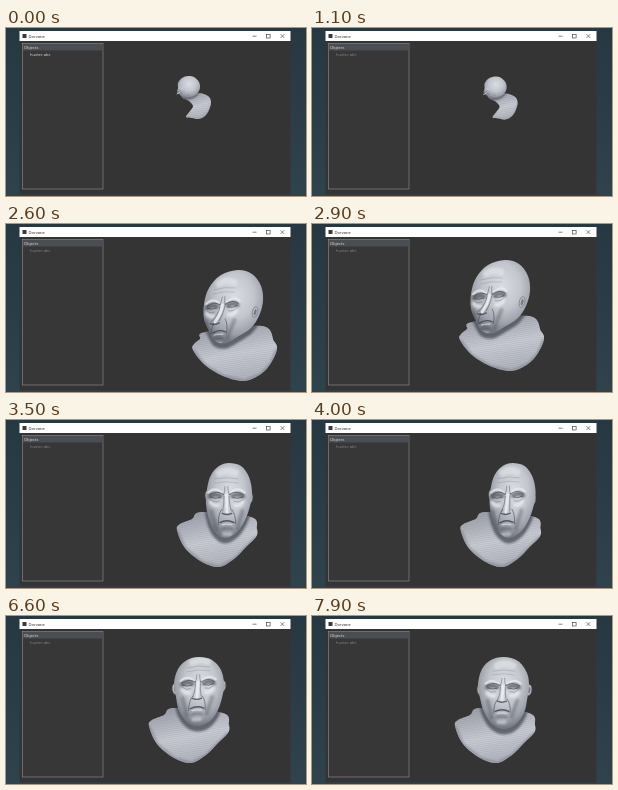
An HTML page that plays this animation: 300 by 168 pixels, repeating every 8 s.

```html
<!DOCTYPE html>
<html lang="en">
<head>
<meta charset="utf-8">
<title>Model viewer</title>
<style>
  html, body { margin: 0; width: 100%; height: 100%; overflow: hidden; background: #2b3d47; }
  svg { display: block; width: 100vw; height: 100vh; }
  text { font-family: "Open Sans", "Noto Sans", sans-serif; font-size: 4.1px; }
</style>
</head>
<body>
<svg viewBox="0 0 300 168">
  <defs>
    <linearGradient id="desk" x2="0" y2="1">
      <stop offset="0" stop-color="#263842"/><stop offset="1" stop-color="#2f434d"/>
    </linearGradient>
    <radialGradient id="skin" cx=".53" cy=".36" r=".62">
      <stop offset="0" stop-color="#d9dce2"/><stop offset=".5" stop-color="#c3c6cd"/>
      <stop offset=".82" stop-color="#9da1aa"/><stop offset="1" stop-color="#747983"/>
    </radialGradient>
    <linearGradient id="chest" x1=".2" y1="0" x2=".5" y2="1">
      <stop offset="0" stop-color="#9a9ea7"/><stop offset=".55" stop-color="#c9ccd3"/>
      <stop offset="1" stop-color="#b0b4bc"/>
    </linearGradient>
    <pattern id="ribs" width="4" height="2" patternUnits="userSpaceOnUse" patternTransform="rotate(9)">
      <path d="M0 .5H4" stroke="#4d525c" stroke-width=".5" opacity=".22"/>
    </pattern>
    <filter id="soft" x="-50%" y="-50%" width="200%" height="200%"><feGaussianBlur stdDeviation="1.3"/></filter>
    <filter id="fine" x="-20%" y="-20%" width="140%" height="140%"><feGaussianBlur stdDeviation=".3"/></filter>
    <clipPath id="headClip"><path id="headEdge"/></clipPath>
    <clipPath id="torsoClip"><path id="torsoEdge"/></clipPath>
  </defs>

  <rect width="300" height="168" fill="url(#desk)"/>
  <rect x="13.5" y="3" width="271" height="163.5" fill="#343434"/>
  <rect x="13.5" y="3" width="271" height="10" fill="#fff"/>
  <rect x="16.5" y="6" width="4" height="4" fill="#3a3a3a"/>
  <text x="22.5" y="9.7" fill="#222">Dorvane</text>
  <g fill="none" stroke="#333" stroke-width=".6">
    <path d="M246.5 8.2h4M274.5 6.2l3.8 3.8m0-3.8l-3.8 3.8"/>
    <rect x="260.5" y="6.4" width="3.6" height="3.6"/>
  </g>
  <rect x="16.5" y="15.5" width="80.5" height="145.5" fill="#373737" stroke="#858585" stroke-width=".7"/>
  <rect x="17" y="16" width="79.5" height="6.5" fill="#4a4d51"/>
  <text x="18" y="21.2" fill="#e4e4e4">Objects</text>
  <text id="label" x="24" y="27.7">huxter.abc</text>
  <g id="bust"></g>
</svg>
<script>
const $ = id => document.getElementById(id);
const LOOP = 8000, STEP = 100;
const LIGHT = '#eceef2', DARK = '#3c4049';
const HEAD = 28, TORSO = 24;

// A pose holds the head outline, the torso outline, then eyes, nose tip, mouth, ears, detail scale, left ear opacity.
const frontTorso = [168,92, 158,99, 146,104, 143,110, 151,128, 168,142, 185,147, 200,139, 212,127, 222,117, 223,109, 217,97];
const bowedHead = [195,43, 207,46, 215,57, 218,72, 216,86, 211,100, 203,112, 191,118, 181,112, 175,100, 172,84, 173,69, 177,55, 185,46];

const small = [
  182,48, 188,49, 193,54, 194,60, 191,66, 186,69, 181,70, 177,70, 175,68, 173,66, 171,64, 172,60, 172,55, 176,50,
  177,69, 183,73, 187,78, 184,83, 180,89, 186,90, 193,91, 199,88, 203,82, 205,74, 202,68, 192,65,
  172,63, 176,65, 171,66, 174,68, 172,62, 182,67, .3, 0];
const above = [
  176,84, 190,87, 200,97, 201,110, 195,122, 185,130, 174,137, 163,137, 154,133, 149,127, 148,120, 152,112, 152,101, 162,88,
  168,136, 172,142, 172,150, 174,155, 182,158, 190,161, 199,161, 209,158, 216,154, 221,151, 212,134, 201,114,
  151,119, 161,124, 148,127, 156,133, 150,118, 175,132, .8, 0];
const turned = [
  232,46, 246,50, 255,62, 257,77, 253,92, 245,104, 233,112, 220,119, 209,117, 203,107, 198,95, 198,80, 203,64, 215,51,
  199,108, 194,115, 188,120, 187,126, 199,141, 217,152, 238,157, 255,150, 265,139, 271,125, 268,117, 256,102,
  206,82, 227,80, 209,98, 213,107, 199,84, 249,88, 1, 0];
const bowed = [...bowedHead, ...frontTorso,
  181,75, 204,75, 193,92, 193,101, 174,76, 216,78, 1, 1];
const tilted = [...bowedHead, ...frontTorso,
  179,75, 200,74, 187,92, 188,101, 174,75, 215,80, 1, 1];
const raised = [
  193,41, 206,44, 215,54, 218,68, 216,82, 211,96, 203,106, 192,110, 181,106, 173,95, 170,81, 168,67, 172,53, 181,44,
  ...frontTorso,
  181,67, 203,66, 191,81, 191,91, 169,73, 217,70, 1, 1];
const level = [
  192,41, 206,45, 215,57, 217,70, 215,84, 212,97, 203,109, 191,113, 180,108, 172,96, 168,82, 166,68, 170,53, 179,44,
  ...frontTorso,
  180,70, 202,70, 190,84, 190,94, 168,74, 217,74, 1, 1];

const lerp = (a, b, k) => a.map((v, i) => v + (b[i] - v) * k);
const moved = (pose, dx, dy) =>
  pose.map((v, i) => i >= HEAD + TORSO + 12 ? v : v + (i % 2 ? dy : dx));

const lowered = moved(small, 1, 36);
const leaning = moved(lerp(above, turned, .06), -12, 2);
const turnedLeft = moved(turned, -39, -10);
const bowedRight = moved(bowed, 28, 0);

const keys = [
  [0, small], [900, small], [1100, moved(small, .6, .6)], [1400, moved(small, .6, .6)],
  [1600, lowered], [1800, lowered], [1900, above], [2000, leaning], [2200, leaning],
  [2600, turned], [2700, turned], [2900, turnedLeft], [3100, turnedLeft],
  [3500, bowedRight], [3600, bowedRight], [4100, tilted], [5500, tilted],
  [6400, raised], [6600, raised], [7900, level], [LOOP, level]];

function poseAt(t) {
  const i = keys.findIndex(([time]) => time > t);
  const [t0, a] = keys[i - 1], [t1, b] = keys[i];
  return lerp(a, b, (t - t0) / (t1 - t0));
}

const pairs = list => Array.from({ length: list.length / 2 }, (_, i) => [list[2 * i], list[2 * i + 1]]);
const fmt = p => p.map(v => v.toFixed(2)).join(' ');

// Closed Catmull-Rom curve through the points.
function smooth(points) {
  const n = points.length, at = i => points[(i + n) % n];
  const handle = (p, a, b) => p.map((v, k) => v + (b[k] - a[k]) / 6);
  return 'M' + fmt(points[0]) + points.map((p, i) => {
    const q = at(i + 1);
    return `C${fmt(handle(p, at(i - 1), q))} ${fmt(handle(q, at(i + 2), p))} ${fmt(q)}`;
  }).join('') + 'Z';
}

function faceParts(face) {
  const [eyeL, eyeR, tip, mouth] = pairs(face.slice(0, 8));
  const s = face[12];
  const mid = lerp(eyeL, eyeR, .5);
  // u runs across the eyes, v from the eyes down to the mouth.
  const at = (u, v, origin = mid) => origin.map((o, k) => o + u * (eyeR[k] - eyeL[k]) / 2 + v * (mouth[k] - mid[k]));
  const arc = (a, b, c, color, width, opacity) =>
    `<path d="M${fmt(a)}Q${fmt(b)} ${fmt(c)}" stroke="${color}" stroke-width="${width * s}" opacity="${opacity}"/>`;
  const line = (u1, v1, u2, v2, u3, v3, ...style) => arc(at(u1, v1), at(u2, v2), at(u3, v3), ...style);
  const both = (u1, v1, u2, v2, u3, v3, ...style) =>
    line(u1, v1, u2, v2, u3, v3, ...style) + line(-u1, v1, -u2, v2, -u3, v3, ...style);

  const shade =
    both(.5, .04, 1, -.08, 1.45, .06, DARK, 4.2, .62) +
    both(1.35, .62, 1.1, .95, .9, 1.3, DARK, 4, .32) +
    both(.75, .4, 1.1, .44, 1.4, .28, LIGHT, 4, .75) +
    line(-.6, -.85, .1, -1, .8, -.85, LIGHT, 7, .5) +
    line(-.45, 1.3, 0, 1.24, .45, 1.3, DARK, 2.4, .4) +
    line(-.3, 1.5, 0, 1.52, .3, 1.5, LIGHT, 4, .5);
  const detail =
    both(.35, -.08, 1, -.34, 1.6, -.1, LIGHT, 2, .7) +
    both(.25, -.02, .9, -.2, 1.5, 0, DARK, 1.1, .6) +
    both(.55, .1, 1, .17, 1.4, .08, DARK, .9, .7) +
    both(.65, .24, 1.05, .32, 1.4, .18, DARK, .7, .4) +
    both(.12, -.32, .12, -.12, .26, 0, DARK, .8, .5) +
    both(.45, .56, .78, .75, .75, 1.12, DARK, 1, .55) +
    [-.46, -.62].map(v => line(-1, v, 0, v - .1, 1, v, DARK, .6, .28)).join('') +
    line(-.62, 1.06, 0, .92, .62, 1.06, DARK, 1.3, .8) +
    line(-.4, 1.14, 0, 1.1, .4, 1.14, LIGHT, 1.3, .6);
  const side = u => arc(at(u, .05), at(u, .35), at(u * 1.7, -.03, tip), DARK, 1.1, .4);
  const nose = side(-.22) + side(.22) +
    arc(at(0, 0), at(0, .3), tip, LIGHT, 2.8, .85) +
    arc(at(-.42, .05, tip), at(0, .14, tip), at(.42, .05, tip), DARK, 1.4, .75);
  return { shade, detail, nose };
}

function ear([x, y], s, tilt, opacity) {
  return `<g transform="translate(${x} ${y}) rotate(${tilt}) scale(${s})" opacity="${opacity}">
    <ellipse rx="2.7" ry="5.4" fill="#b9bdc5" stroke="#686d77" stroke-width=".6"/>
    <ellipse cx=".2" cy=".2" rx="1.2" ry="3.2" fill="${DARK}" opacity=".55"/></g>`;
}

function drawBust(pose) {
  const head = smooth(pairs(pose.slice(0, HEAD)));
  const torsoPoints = pairs(pose.slice(HEAD, HEAD + TORSO));
  const torso = smooth(torsoPoints);
  const face = pose.slice(HEAD + TORSO);
  const s = face[12];
  const { shade, detail, nose } = faceParts(face);
  const [earL, earR] = pairs(face.slice(8, 12));
  const rim = torsoPoints.slice(3, 10).map(fmt).join('L');
  $('headEdge').setAttribute('d', head);
  $('torsoEdge').setAttribute('d', torso);
  $('bust').innerHTML = `
    <path d="${torso}" fill="url(#chest)"/>
    <g clip-path="url(#torsoClip)">
      <path d="${torso}" fill="url(#ribs)"/>
      <path d="M${rim}" fill="none" stroke="#6f747e" stroke-width="${2.4 * s}" opacity=".55" filter="url(#soft)"/>
      <path d="${head}" transform="translate(0 ${4 * s})" fill="${DARK}" stroke="${DARK}"
        stroke-width="${3 * s}" opacity=".7" filter="url(#soft)"/>
    </g>
    ${ear(earL, s, -6, face[13])}
    ${face[13] > .5 ? ear(earR, s, 6, 1) : ''}
    <path d="${head}" fill="url(#skin)"/>
    <g fill="none" stroke-linecap="round">
      <g clip-path="url(#headClip)"><g filter="url(#soft)">${shade}</g><g filter="url(#fine)">${detail}</g></g>
      <g filter="url(#fine)">${nose}</g>
    </g>
    ${face[13] > .5 ? '' : ear(earR, s, 14, 1)}`;
}

let shown = -1;
const start = performance.now();
function tick(now) {
  const t = Math.floor((Math.max(0, now - start) % LOOP) / STEP) * STEP;
  if (t !== shown) {
    shown = t;
    $('label').setAttribute('fill', t < 300 ? '#e0e0e0' : t < 400 ? '#b0b0b0' : '#878787');
    drawBust(poseAt(t));
  }
  requestAnimationFrame(tick);
}
tick(start);
</script>
</body>
</html>
```
